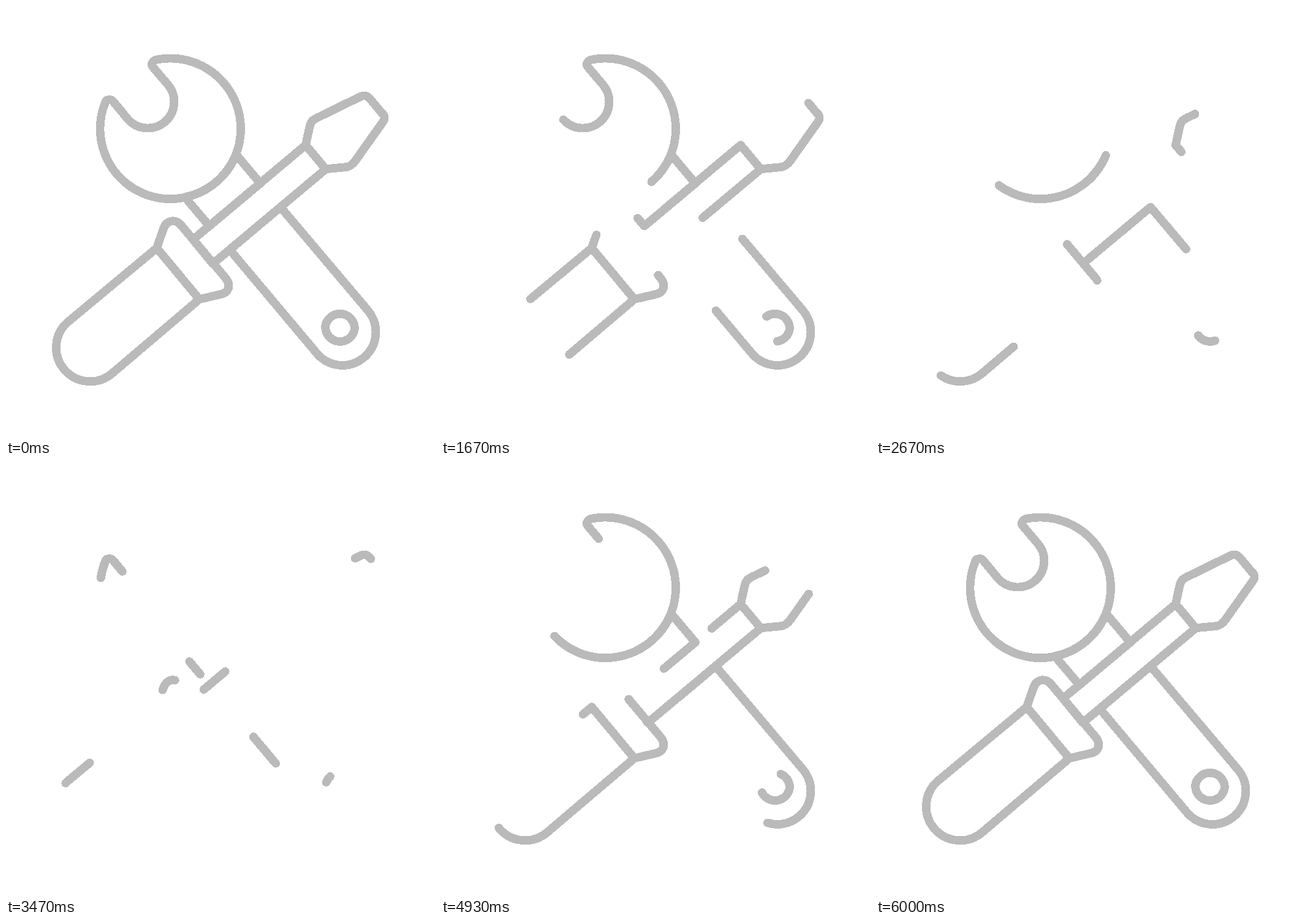
Animation of 700 by 704 pixels, one loop 7010 ms. Source, as an HTML page:

```html
<!DOCTYPE html>
<html lang="en">
<head>
<meta charset="utf-8">
<title>Tools</title>
<style>
  html, body { margin: 0; width: 100%; height: 100%; overflow: hidden; background: #fff; }
  svg { display: block; width: 100%; height: 100%; shape-rendering: crispEdges; }
  path { fill: none; stroke: #bababa; stroke-width: 13.8; stroke-linecap: round; stroke-linejoin: round; }
</style>
</head>
<body>
<svg viewBox="0 0 700 704">
  <!-- wrench: head, neck, handle, hole -->
  <path pathLength="1" d="M355.1 125.4A114.7 114.7 0 1 1 162.2 157C164.2 152.2 171.3 151.4 175.5 156.5L198.6 184.5A43 43 0 0 0 264 128.3L240 100C236 95.5 238.5 88.5 247 87.5A114.7 114.7 0 0 1 355.1 125.4Z"/>
  <path pathLength="1" d="M415 289.7L375.5 242.7A114.7 114.7 0 0 1 292 312.3L331.8 359.4Z"/>
  <path pathLength="1" d="M590.5 497.3L448 328.5L365.2 398.2L507.5 567.7A54.3 54.3 0 0 0 590.5 497.3Z"/>
  <path pathLength="1" d="M568.9 527.1A24 24 0 0 1 521.1 523.7A24 24 0 0 1 568.9 527.1Z"/>
  <!-- screwdriver: blade, shaft, collar, handle -->
  <path pathLength="1" d="M553 263.3L521.7 266.3L488.9 227.2L495.4 197.7C497.4 188.7 500.4 186.1 507.5 182.7L578 148.2C584.5 145 589 146 594 151.7L613 174.5C619 180 618.5 184.5 614.5 190L572 250C567 258 562 262.5 553 263.3Z"/>
  <path pathLength="1" d="M521.7 266.5L337.5 421L305.2 381.5L488.9 227.2Z"/>
  <path pathLength="1" d="M315.5 479L352 470.5C363 468 368 456 358 444L285.7 358.1C277 347.3 261 348.8 256.2 366L246 395.3Z"/>
  <path pathLength="1" d="M315.5 479L172.9 600.3A55.3 55.3 0 0 1 101.7 515.5L246 395.3Z"/>
</svg>
<script>
  const LOOP = 7010, FPS = 30, HOLD = 15, TURN = 165;
  const paths = document.querySelectorAll('path');

  // The visible part shrinks to nothing, then regrows, while it travels once around each outline.
  function draw(ms) {
    const frame = Math.floor((ms % LOOP + 4) * FPS / 1000);
    const p = Math.min(1, Math.max(0, (frame - HOLD) / TURN));
    const length = Math.abs(1 - 2 * p);
    const start = (p + Math.min(1, 2 * p)) % 1;
    for (const path of paths) {
      path.style.strokeDasharray = length === 1 ? 'none' : `${length} ${1 - length}`;
      path.style.strokeDashoffset = 1 - start;
    }
  }

  const begin = performance.now();
  function tick() {
    draw(performance.now() - begin);
    requestAnimationFrame(tick);
  }
  tick();
</script>
</body>
</html>
```
